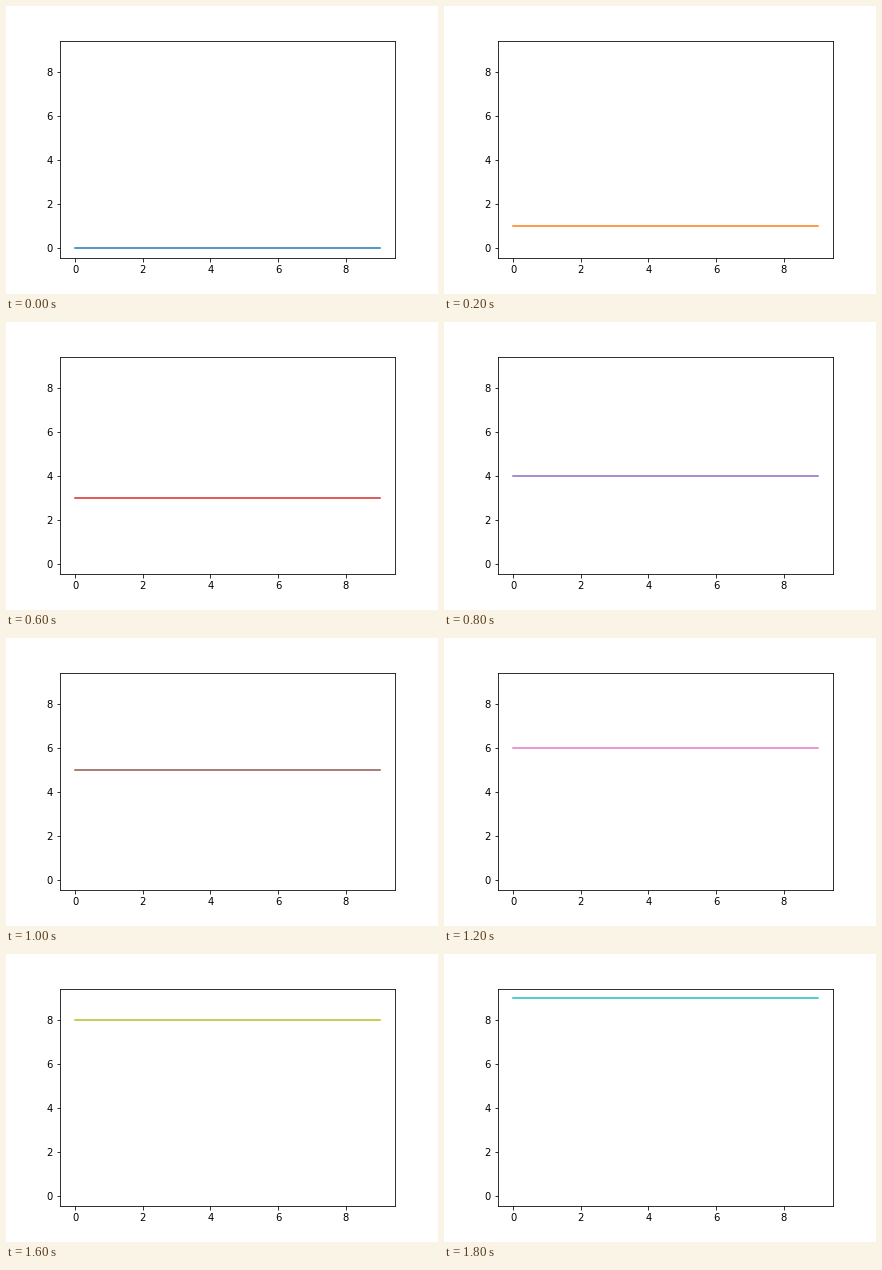
A matplotlib script that plays this animation: 432 px wide and 288 px high, repeating every 2 s.

```python
import matplotlib.pyplot as plt
from matplotlib.animation import ArtistAnimation

COUNT = 10
LOOP_MS = 2000

plt.rcParams["font.family"] = "DejaVu Sans"
plt.rcParams["font.size"] = 10

fig, ax = plt.subplots(figsize=(6, 4), dpi=72, facecolor="white")
fig.subplots_adjust(left=0.125, right=0.9, bottom=0.125, top=0.88)

# One level line per step, each in the next colour of the default cycle.
steps = [
    ax.plot(range(COUNT), [level] * COUNT, color=f"C{level}")
    for level in range(COUNT)
]

ticks = range(0, COUNT, 2)
ax.set(xlim=(-0.45, 9.45), ylim=(-0.45, 9.45), xticks=ticks, yticks=ticks)

anim = ArtistAnimation(
    fig, steps, interval=LOOP_MS // COUNT, repeat=True, repeat_delay=0
)

plt.show()
```
